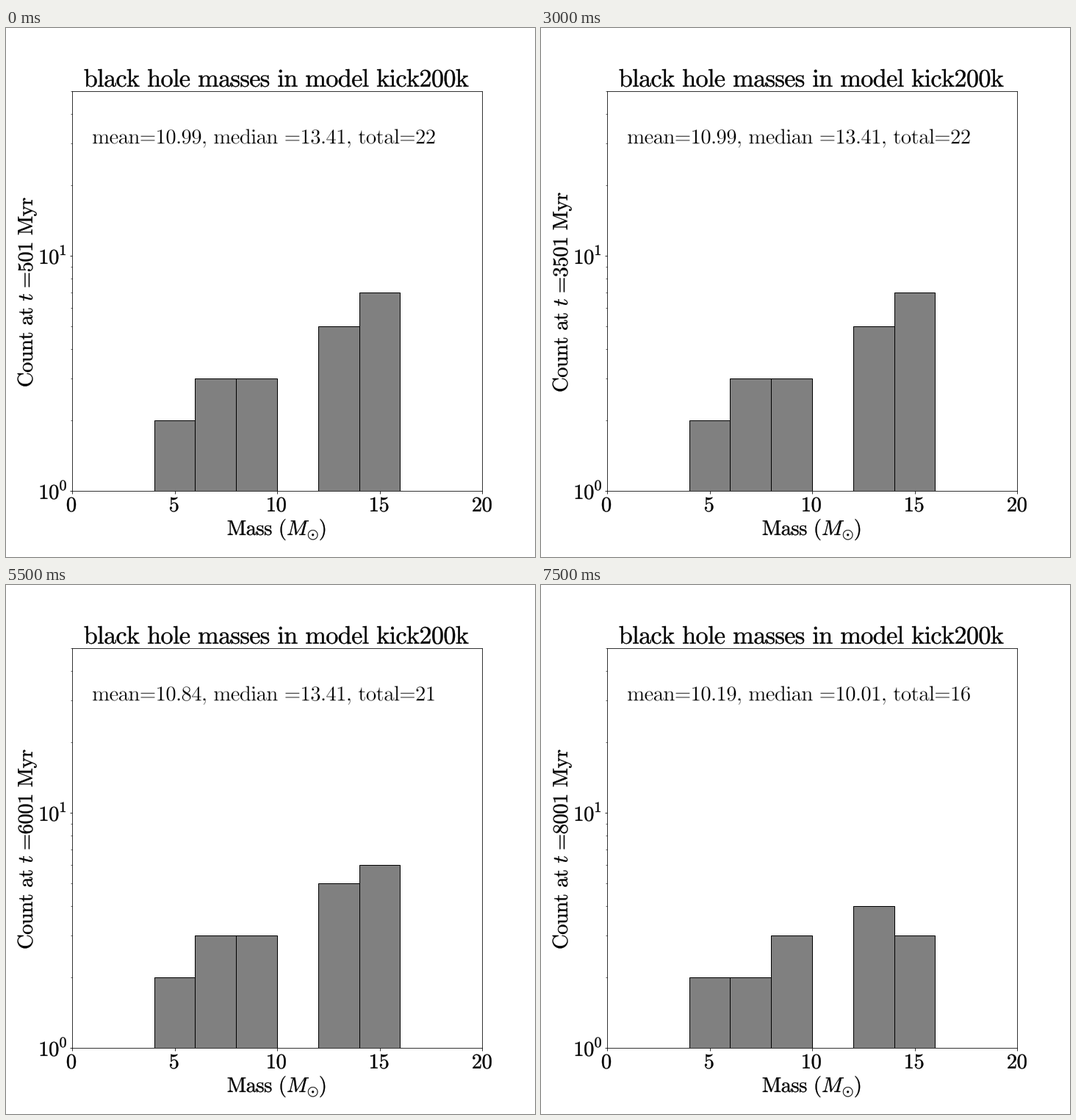
Animation, 720 px wide and 720 px high, one loop 8 s. Source, as a matplotlib script:

```python
import matplotlib.pyplot as plt
from matplotlib.animation import FuncAnimation
from matplotlib.patches import PathPatch
from matplotlib.textpath import TextPath
from matplotlib.ticker import NullFormatter
from matplotlib.transforms import Affine2D

plt.rcParams["mathtext.fontset"] = "cm"

STAGE = 720
FRAMES, INTERVAL = 16, 500
BODY, TITLE, EXPONENT = 28.75, 34.4, 20.1
BOLD = 0.35
# Slightly tight tracking, as in display sizes of the face
TIGHT = r"\hspace{-0.0237}"
SPACE = r"\hspace{0.332}"

# first step, counts of the five bars, mean, median, total
STATES = [
    (0, (2, 3, 3, 5, 7), "10.99", "13.41", 22),
    (11, (2, 3, 3, 5, 6), "10.84", "13.41", 21),
    (12, (2, 2, 3, 5, 6), "11.0", "13.41", 20),
    (13, (2, 2, 3, 4, 3), "10.19", "10.01", 16),
]


def words(text):
    return SPACE.join(TIGHT.join(r"\text{%s}" % c for c in word)
                      for word in text.split())


def glyphs(math, size, align):
    """Outline of a math string, aligned on its ink (0 left, 0.5 centre)."""
    path = TextPath((0, 0), f"${math}$", size=size)
    box = path.get_extents()
    return path.transformed(
        Affine2D().translate(-box.x0 - align * box.width, 0))


fig = plt.figure(figsize=(10, 10), dpi=72, facecolor="white")

ax = fig.add_axes([0.125, 0.125, 0.775, 0.755])
bars = ax.bar([4, 6, 8, 12, 14], STATES[0][1], width=2, align="edge",
              color="gray", edgecolor="black", linewidth=1)
ax.set_yscale("log")
ax.set_xlim(0, 20)
ax.set_ylim(1, 50)
ax.set_xticks(range(0, 21, 5))
for axis in (ax.xaxis, ax.yaxis):
    axis.set_major_formatter(NullFormatter())
    axis.set_minor_formatter(NullFormatter())

# Lettering layer in stage pixels
layer = fig.add_axes([0, 0, 1, 1])
layer.set(xlim=(0, STAGE), ylim=(0, STAGE))
layer.axis("off")


def label(math, x, y, size=BODY, align=0.5, edge="black", weight=BOLD,
          angle=0):
    place = Affine2D().rotate_deg(angle).translate(x, STAGE - y)
    patch = PathPatch(glyphs(math, size, align), facecolor="black",
                      edgecolor=edge, linewidth=weight,
                      transform=place + layer.transData)
    return layer.add_patch(patch)


label(words("black hole masses in model kick200k"), 368, 80, TITLE)
label(words("Mass (") + r"M_{\hspace{-0.2}\odot}\hspace{-0.2}" + words(")"),
      368, 690)
for value in range(0, 21, 5):
    label(words(str(value)), 89 + 27.95 * value, 658)
for power, y in ((0, 641), (1, 321)):
    label(words("10"), 59, y)
    label(words(str(power)), 77.5, y - 12, EXPONENT)


def time_text(i):
    return (words("Count at") + SPACE + r"t\hspace{0.28}"
            + words(f"={501 + 500 * i} Myr"))


def stats_text(mean, median, total):
    return words(f"mean={mean}, median ={median}, total={total}")


time_label = label(time_text(0), 36, 359.5, angle=90)
# A thin white outline gives the lighter weight
stats_label = label(stats_text(*STATES[0][2:]), 118, 157.5, align=0,
                    edge="white", weight=0.25)


def update(i):
    _, counts, *stats = [s for s in STATES if s[0] <= i][-1]
    for bar, count in zip(bars, counts):
        bar.set_height(count - bar.get_y())
    time_label.set_path(glyphs(time_text(i), BODY, 0.5))
    stats_label.set_path(glyphs(stats_text(*stats), BODY, 0))
    return [*bars, time_label, stats_label]


anim = FuncAnimation(fig, update, frames=FRAMES, interval=INTERVAL,
                     repeat=True, repeat_delay=0, blit=False)
plt.show()
```
